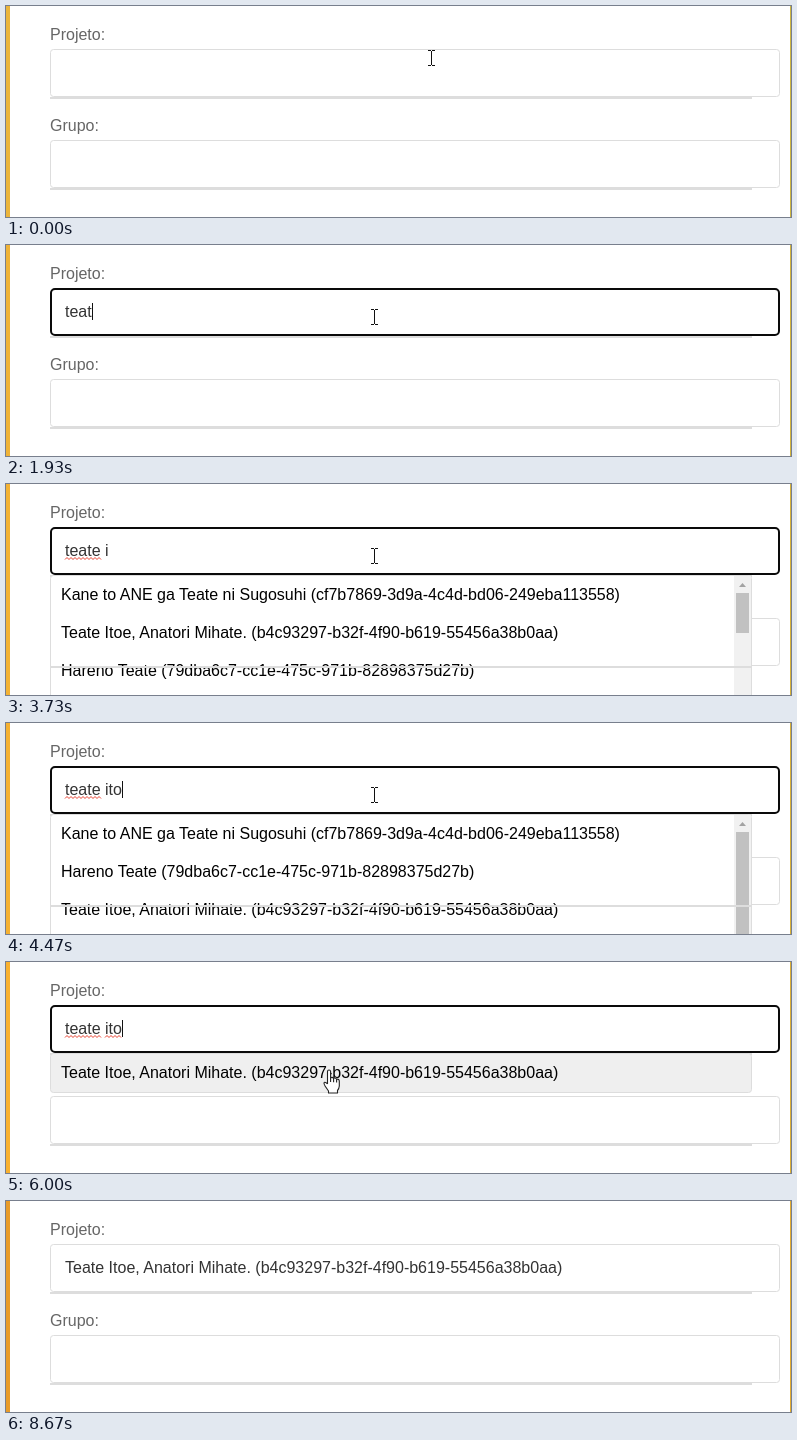
Write an HTML page that moves like this. It is 785 px wide and 211 px high and loops after 8.74 s.

```html
<!DOCTYPE html>
<html lang="pt">
<head>
<meta charset="utf-8">
<title>Projeto</title>
<style>
html, body { margin: 0; width: 100%; height: 100%; overflow: hidden; background: #fff; }
svg { display: block; width: 785px; height: 211px; }
text { font: 16px "Liberation Sans", Arial, sans-serif; white-space: pre; }
.label { fill: #666; }
.value { fill: #333; }
.field { fill: #fff; stroke: #ddd; }
.line { fill: #ddd; }
.focus { fill: none; stroke: #0a0a0a; stroke-width: 2; }
.wave { fill: none; stroke: #e8402f; }
</style>
</head>
<body>
<svg viewBox="0 0 785 211">
  <rect width="785" height="211" fill="#fff"/>
  <rect id="left" width="4" height="211"/>
  <rect id="right" x="784" width="1" height="211"/>

  <text class="label" x="44" y="34">Projeto:</text>
  <rect class="line" x="44" y="91" width="702" height="2"/>
  <rect id="input" class="field" x="44.5" y="43.5" width="729" height="47" rx="3"/>
  <rect id="focus" class="focus" x="45" y="44" width="728" height="46" rx="4"/>
  <text id="value" class="value" x="59" y="72"></text>
  <path id="wave1" class="wave"/>
  <path id="wave2" class="wave"/>
  <rect id="caret" y="58" width="1" height="17" fill="#111"/>

  <text class="label" x="44" y="125">Grupo:</text>
  <rect class="field" x="44.5" y="134.5" width="729" height="47" rx="3"/>

  <g id="list">
    <rect id="panel" x="44.5" y="91.5" width="701" rx="3" stroke="#ddd"/>
    <text class="row" x="55" y="116"></text>
    <text class="row" x="55" y="154"></text>
    <text class="row" x="55" y="192"></text>
    <g id="scroll">
      <rect x="728" y="92" width="17" height="119" fill="#f1f1f1"/>
      <path d="M733 103h7l-3.5-4z" fill="#a3a3a3"/>
      <rect id="thumb" x="730" y="109" width="13" fill="#c1c1c1"/>
    </g>
  </g>
  <rect class="line" x="44" y="182" width="702" height="2"/>

  <path id="beam" fill="none" stroke="#111"
    d="M-3 -7.5h3M1 -7.5h3M-3 7.5h3M1 7.5h3M.5 -7v14"/>
  <path id="hand" fill="#fff" stroke="#222" stroke-width="1.1" stroke-linejoin="round"
    d="M-1.5 14V1.5Q-1.5 0 0 0T1.6 1.5V8Q3 6.6 4.6 8.4Q6.4 7.4 7.6 9.2Q10.3 8.6 10.3 11.4V16Q10 19 8.5 20.5V23H-.5V21Q-2 18.8 -3.8 16.2Q-5.6 13.6 -4.8 12.4Q-3.4 11.6 -1.5 14M1.6 8v4M4.6 8.6v3.6M7.6 9.4v3"/>
  <path id="arrow" fill="#fff" stroke="#111"
    d="M.5 .5V16.5L4.2 13L6.7 18.7L9.2 17.6L6.7 12H11.6Z"/>
</svg>
<script>
const LOOP = 8740, TICK = 200 / 3, BLINK = 530;
const FOCUS = 470, HOVER = 5670, SELECT = 6270, GONE = 7000;
const $ = id => document.getElementById(id);
const rows = [...document.querySelectorAll('.row')];

const bird = 'Teate Itoe, Anatori Mihate. (b4c93297-b32f-4f90-b619-55456a38b0aa)';
const bell = 'Kane to ANE ga Teate ni Sugosuhi (cf7b7869-3d9a-4c4d-bd06-249eba113558)';
const clear = 'Hareno Teate (79dba6c7-cc1e-475c-971b-82898375d27b)';

const query = 'teate ito';
const keys = [1200, 1470, 1670, 1930, 2130, 2200, 3200, 4130, 4470];
const results = [
  { from: 0, items: [] },
  { from: 2200, items: [clear, bell, bird], thumb: 30 },
  { from: 2870, items: [bell, bird, clear], thumb: 40 },
  { from: 3870, items: [bell, clear, bird], thumb: 102 },
  { from: 4800, items: [bird] },
  { from: SELECT, items: [] }
];

const set = (id, name, v) => $(id).setAttribute(name, v);
const show = (id, on) => set(id, 'visibility', on ? 'visible' : 'hidden');
const part = (t, from, to) => Math.min(1, Math.max(0, (t - from) / (to - from)));
const smooth = k => k * k * (3 - 2 * k);
const mix = (a, b, k) => a.map((v, i) => v + (b[i] - v) * k);

function pointerAt(t) {
  const field = [368, 72], item = [323, 108], exit = [318, 225];
  if (t < 5400) {
    const k = part(t, 0, 333);
    return [mix([425], field, smooth(k))[0], 52 + 20 * k * k - 8 * Math.sin(Math.PI * k)];
  }
  if (t < 6333) return mix(field, item, smooth(part(t, 5400, 6000)));
  return mix(item, exit, part(t, 6333, GONE) ** 1.6);
}

function drawEdges(t) {
  const gold = [235, 181, 60], orange = [249, 176, 46], amber = [232, 154, 41];
  const peak = 6300;
  const left = t < peak
    ? mix(gold, orange, part(t, 0, peak))
    : mix(orange, amber, part(t, peak, LOOP));
  const right = mix([205, 182, 66], [226, 172, 50], part(t, 0, LOOP));
  set('left', 'fill', `rgb(${left.map(Math.round)})`);
  set('right', 'fill', `rgb(${right.map(Math.round)})`);
}

function drawInput(t) {
  const pressed = keys.filter(k => k <= t);
  const text = t < SELECT ? query.slice(0, pressed.length) : bird;
  const value = $('value');
  if (value.textContent !== text) value.textContent = text;

  const active = t >= FOCUS && t < SELECT;
  const since = t - (pressed.pop() || FOCUS);
  show('focus', active);
  show('input', !active);
  show('caret', active && since % (2 * BLINK) < BLINK);
  set('caret', 'x', Math.round(59 + (text ? value.getComputedTextLength() : 0)));
  show('wave1', active && t >= keys[5]);
  show('wave2', active && t >= keys[8] + 2 * BLINK);
}

function drawList(t) {
  const { items, thumb } = results.filter(r => r.from <= t).pop();
  $('list').style.display = items.length ? '' : 'none';
  rows.forEach((r, i) => r.textContent = items[i] || '');
  set('panel', 'height', items.length > 1 ? 130 : 39);
  set('panel', 'fill', t >= HOVER ? '#efefef' : '#fff');
  $('scroll').style.display = thumb ? '' : 'none';
  set('thumb', 'height', thumb || 0);
}

function drawPointer(t) {
  const [x, y] = pointerAt(Math.floor((t + 4) / TICK) * TICK).map(Math.round);
  const overInput = y < 91 || (y > 134 && y < 182);
  const kind = overInput ? 'beam' : t < SELECT ? 'hand' : 'arrow';
  for (const id of ['beam', 'hand', 'arrow']) show(id, id === kind && t < GONE);
  set(kind, 'transform', `translate(${x} ${y})`);
}

function wave(id, from, to) {
  let d = `M${from} 75.5`;
  for (let x = from + 2, up = true; x <= to; x += 2, up = !up) d += `L${x} ${up ? 73.5 : 75.5}`;
  set(id, 'd', d);
}

wave('wave1', 59, 95);
wave('wave2', 99, 116);
const start = performance.now();
function frame() {
  const t = (performance.now() - start) % LOOP;
  drawEdges(t);
  drawInput(t);
  drawList(t);
  drawPointer(t);
  requestAnimationFrame(frame);
}
frame();
</script>
</body>
</html>
```
